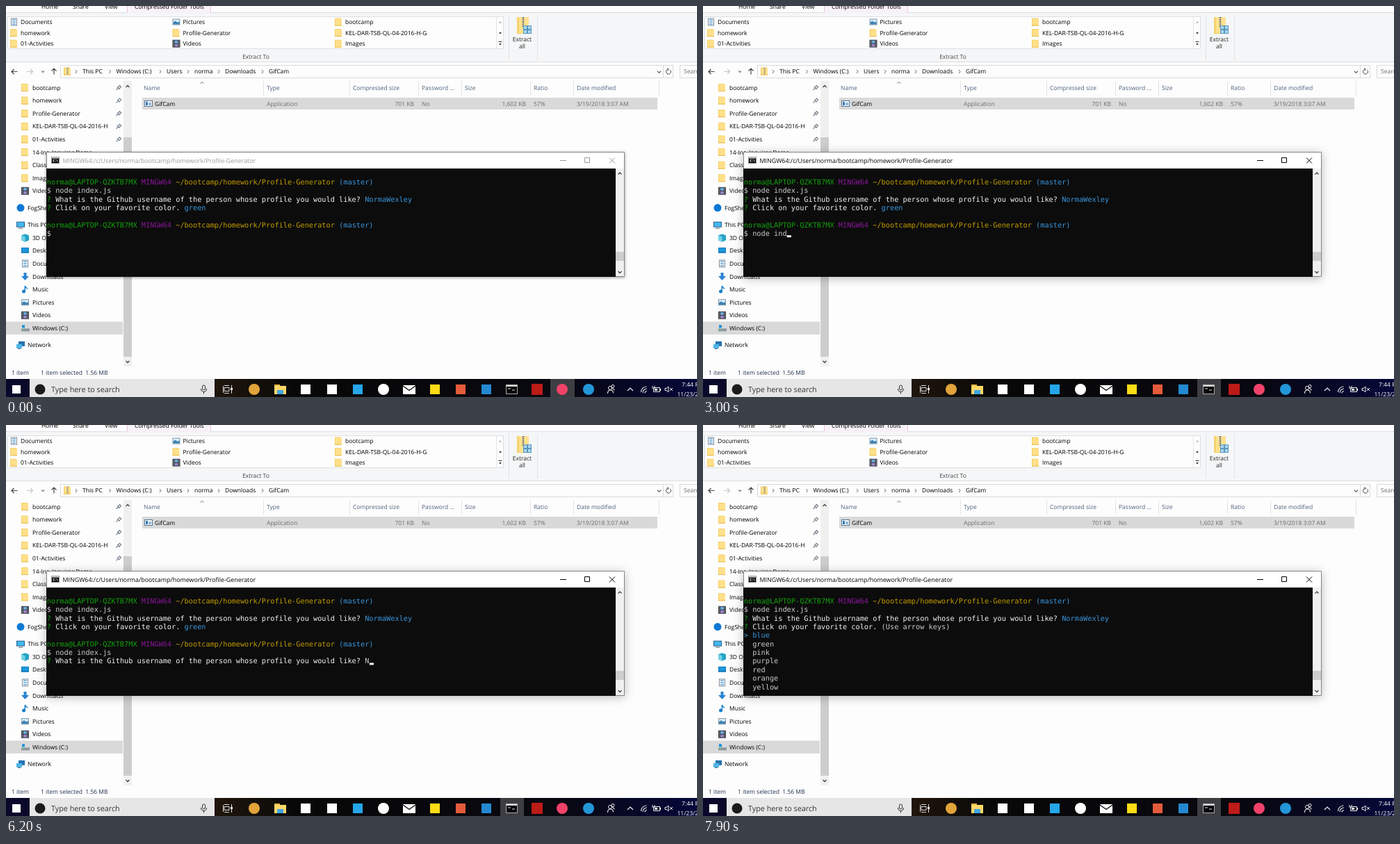
Recreate the animation shown at these times as an HTML page. Size 994 by 563 pixels, loop 8000 ms.

```html
<!DOCTYPE html>
<html lang="en">
<head>
<meta charset="utf-8">
<style>
html, body { margin: 0; width: 100%; height: 100%; overflow: hidden; background: #fdfdfd; }
svg { display: block; width: 994px; height: 563px; font: 8.5px "Open Sans", sans-serif; }
text { white-space: pre; text-rendering: geometricPrecision; }
.big { font-size: 10.8px; }
#caption { font-size: 8.9px; }
#term { font: 10.28px "DejaVu Sans Mono", monospace; }
</style>
</head>
<body>
<svg id="stage" viewBox="0 0 994 563"></svg>
<script>
const USER = 'norma', LOGIN = 'NormaWexley', COURSE = 'KEL-DAR-TSB-QL-04-2016-H-G';

const text = (x, y, s, fill = '#000', extra = '') => `<text x="${x}" y="${y}" fill="${fill}" ${extra}>${s}</text>`;
const rect = (x, y, w, h, fill, extra = '') => `<rect x="${x}" y="${y}" width="${w}" height="${h}" fill="${fill}" ${extra}/>`;
const frame = (x, y, w, h, stroke, fill = 'none') => rect(x + .5, y + .5, w - 1, h - 1, fill, `stroke="${stroke}"`);
const line = (d, stroke = '#444', width = 1, dash = 'none') =>
  `<path d="${d}" fill="none" stroke="${stroke}" stroke-width="${width}" stroke-dasharray="${dash}"/>`;
const shape = (d, fill) => `<path d="${d}" fill="${fill}"/>`;
const disc = (x, y, r, fill) => `<circle cx="${x}" cy="${y}" r="${r}" fill="${fill}"/>`;
const middle = 'text-anchor="middle"', right = 'text-anchor="end"';
const chevronRight = (x, y, color) => line(`M${x - 1} ${y - 2.5}l2 2.5l-2 2.5`, color, .9);
const chevronDown = (x, y, size, color) => line(`M${x - size} ${y - size / 2}l${size} ${size}l${size} ${-size}`, color, 1.1);

// Small icons, each about 11 by 11 with its top left corner at x, y
const icons = {
  folder: (x, y) => rect(x, y, 9, 11, '#f5cf68') + rect(x + 1, y + 1, 9, 10, '#ffe08a') + rect(x, y + 10, 10, 1, '#e7bd55'),
  doc: (x, y) => frame(x + 1, y, 9, 11, '#7d8b99', '#fff') + [2.5, 5.5, 8.5].map(d => line(`M${x + 3} ${y + d}h5`, '#4795cf', 1.3)).join(''),
  picture: (x, y) => frame(x, y + 1, 11, 9, '#8294a3', '#d9effb') + shape(`M${x + 1} ${y + 9}v-3l3-2 3 2 3-1v4z`, '#3f83b3'),
  video: (x, y) => rect(x, y, 11, 11, '#33363d') + rect(x + 3, y + 1, 5, 4, '#6aa8d8') + rect(x + 3, y + 6, 5, 4, '#9c83c4') +
    line(`M${x + 1.5} ${y + 1}v10M${x + 9.5} ${y + 1}v10`, '#ccc', 1, '1 1'),
  cloud: (x, y) => disc(x + 6, y + 5.5, 5.5, '#0f78d4'),
  pc: (x, y) => rect(x, y + 1, 12, 8, '#2a5d8c') + rect(x + 1, y + 2, 10, 6, '#43b8ee') + rect(x + 3, y + 10, 6, 1, '#567'),
  cube: (x, y) => shape(`M${x} ${y + 2}l5.5-2 5.5 2v7l-5.5 2.5-5.5-2.5z`, '#27a2c5') + shape(`M${x} ${y + 2}l5.5 2v7.5l-5.5-2.5z`, '#73d2e6'),
  desktop: (x, y) => rect(x, y + 1, 11, 8, '#1279be') + rect(x + 1, y + 2, 9, 5, '#1c98dd'),
  download: (x, y) => shape(`M${x + 3.5} ${y}h4v5h3.5l-5.5 6-5.5-6h3.5z`, '#2b83d1'),
  music: (x, y) => disc(x + 3.5, y + 8.5, 2.5, '#1b80c9') + line(`M${x + 5.3} ${y + 9}v-8.5q1 3 4 4`, '#1b80c9', 1.5),
  disk: (x, y) => rect(x, y + 6, 12, 4, '#8d979e') + rect(x + 1, y + 7, 3, 1, '#5ed86c') + rect(x + 1, y + 1, 4, 4, '#1590d8'),
  network: (x, y) => rect(x + 3, y, 9, 7, '#2572ae') + rect(x, y + 4, 8, 6, '#4cb6e8') + rect(x + 2, y + 10, 4, 1, '#456'),
};

function ribbon() {
  let s = rect(0, 0, 994, 9, '#fdfdfd') + rect(0, 9, 994, 71, '#f5f6f7') + line('M0 9.5H174M295 9.5H994M0 80.5H994', '#dcdddf');
  s += line('M174.5 0V9.5M294.5 0V9.5', '#efc1df') + rect(175, 0, 119, 10, '#f8f2f6');
  s += text(51, 4, 'Home') + text(96, 4, 'Share') + text(142, 4, 'View') + text(185, 4, 'Compressed Folder Tools');
  s += frame(2, 15, 714, 47, '#dcdfe3', '#fdfdfd') + line('M705.5 15V62M723.5 13V78M764.5 13V78', '#e2e3e4');
  const gallery = [
    ['doc', 'Documents'], ['folder', 'homework'], ['folder', '01-Activities'],
    ['picture', 'Pictures'], ['folder', 'Profile-Generator'], ['video', 'Videos'],
    ['folder', 'bootcamp'], ['folder', COURSE], ['folder', 'Images']];
  gallery.forEach(([icon, label], i) => {
    const x = 6 + 233.5 * Math.floor(i / 3), y = 17.5 + 15.6 * (i % 3);
    s += icons[icon](x, y) + text(x + 15, y + 8.7, label);
  });
  s += shape('M709 24.5h4l-2-2.5z', '#aaa') + shape('M709 38h4l-2 2.5zM709 54h4l-2 2.5z', '#333') + line('M708.5 51.5h5', '#333');
  s += text(359.5, 76, 'Extract To', '#444', middle) + text(742.5, 51, 'Extract', '#222', middle) + text(742.5, 61, 'all', '#222', middle);
  s += rect(735, 16, 16, 24, '#f6d36f') + rect(738, 16, 14, 23, '#ffe28e') + line('M744 16v14', '#69757d', 2.5, '2 1');
  return s + [0, 1, 2, 3].map(i => frame(744 + 6 * (i % 2), 28 + 6 * (i >> 1), 6, 6, '#5b96bd', '#a9d8ef')).join('');
}

function addressBar() {
  let s = line('M16.5 94.5H8M11.5 91l-3.5 3.5 3.5 3.5M69 98.5V90M65.5 93.5l3.5-3.5 3.5 3.5', '#444', 1.2);
  s += line('M30 94.5h8.5M35 91l3.5 3.5-3.5 3.5', '#c6c6c6', 1.2) + chevronDown(53, 94.5, 2, '#777');
  s += frame(78, 85, 882, 19, '#dadada', '#fdfdfd') + line('M945.5 85V104', '#dadada') + frame(969, 85, 40, 19, '#dadada', '#fdfdfd');
  s += icons.folder(83, 88.5) + line('M88.5 89v10', '#69757d', 2, '1 1');
  const crumbs = [[110, 'This PC'], [158.5, 'Windows (C:)'], [231, 'Users'], [271, USER], [315, 'Downloads'], [378, 'GifCam']];
  for (const [x, label] of crumbs) s += chevronRight(x - 9, 94.5, '#555') + text(x, 97, label);
  s += chevronDown(939.5, 95, 2.6, '#444') + line('M955.6 92.2A3.5 3.5 0 1 1 952 91.2M951 89.5l2.5 1.7-2 2');
  return s + text(975, 97, 'Search GifCam', '#6d6d6d');
}

function sidebar() {
  let s = rect(0, 454.5, 168, 18.5, '#d9d9d9');
  const rows = ['folder|bootcamp', 'folder|homework', 'folder|Profile-Generator', 'folder|' + COURSE.slice(0, -2), 'folder|01-Activities',
    'folder|14-Ins_Inquirer-Demo', 'folder|Class-Notes', 'folder|Images', 'video|Videos', 'cloud|FogShelf', 'pc|This PC', 'cube|3D Objects',
    'desktop|Desktop', 'doc|Documents', 'download|Downloads', 'music|Music', 'picture|Pictures', 'video|Videos', 'disk|Windows (C:)', 'network|Network'];
  rows.forEach((row, i) => {
    const [icon, label] = row.split('|');
    const y = 117.5 + 18.6 * i + (i > 8) * 5.7 + (i > 9) * 5.9 + (i > 18) * 5.9;
    const x = ['cloud', 'pc', 'network'].includes(icon) ? 15 : 22;
    s += icons[icon](x, y - 5.5) + text(x + 16, y + 3, label);
    if (i < 5) s += line(`M158.5 ${y + 3.5}l2.5-2.5M160 ${y - 1}l3.5 3.5M161 ${y - .5}l2.5-2.5 2 2-2.5 2.5`, '#7c8792', 1.3);
  });
  s += rect(169, 108, 12, 411, '#f0f0f0') + rect(169, 189, 12, 316, '#cdcdcd');
  return s + line('M172.5 117l2.5-2.5 2.5 2.5M172.5 511l2.5 2.5 2.5-2.5', '#444', 1.3);
}

function fileList() {
  const heads = [[198, 'Name'], [375, 'Type'], [499, 'Compressed size'], [598, 'Password ...'], [660, 'Size'], [759, 'Ratio'], [821, 'Date modified']];
  let s = heads.map(([x, label]) => text(x, 121, label, '#4c607a')).join('');
  s += line([370, 494, 593, 655, 754, 816, 939].map(x => `M${x}.5 108V129`).join(''), '#e3e3e3') + line('M279.5 111.5l2.5-2 2.5 2', '#777');
  s += rect(196, 132, 741, 17, '#d9d9d9') + frame(199, 136, 12, 9, '#56728c', '#fff') + rect(201, 138, 3, 5, '#2d79b8') + rect(205, 139, 4, 4, '#8bb6d8');
  s += text(214, 143.5, 'GifCam');
  const cells = [[375, 'Application'], [587, '701 KB', right], [598, 'No'], [748, '1,602 KB', right], [759, '57%'], [821, '3/19/2018 3:07 AM']];
  for (const [x, label, anchor] of cells) s += text(x, 143.5, label, '#6d6d6d', anchor);
  return s + text(8, 531, '1 item', '#1e2f4b') + text(50, 531, '1 item selected  1.56 MB', '#1e2f4b');
}

function taskbar() {
  const square = (x, color, r = 7) => rect(x - r, 552 - r, 2 * r, 2 * r, color);
  const stops = [[0, '#08082c'], [.3, '#20160c'], [.42, '#080808'], [.8, '#080810'], [1, '#06083a']];
  let s = `<linearGradient id="bar">${stops.map(([at, c]) => `<stop offset="${at}" stop-color="${c}"/>`).join('')}</linearGradient>`;
  s += rect(0, 537, 994, 26, 'url(#bar)') + '<g id="active"></g>';
  s += square(15, '#fff', 6) + rect(34, 537, 266, 26, '#e6e6e7') + disc(49, 552, 7.5, '#1b1b1b') + text(65, 556, 'Type here to search', '#333', 'class="big"');
  s += rect(282.5, 546, 4, 7, 'none', 'rx="2" stroke="#333"') + line('M280.5 551q0 4.5 4 4.5t4-4.5M284.5 555.5v3', '#333');
  s += line('M312.5 547v10M314 549.5h7v5h-7zM314 546.5h7M314 557.5h7M324.5 546v12', '#ddd') + rect(323, 550, 3, 3, '#fff');
  s += disc(357, 552, 8, '#e2a33a') + rect(386, 545, 8, 4, '#e9b63e') + rect(386, 547, 17, 12, '#ffd869') + rect(390, 553, 9, 6, '#41a5e1');
  s += square(431, '#fff') + square(469, '#fff') + square(506, '#25a6e9') + disc(543, 552, 8, '#fff');
  s += rect(571, 546, 18, 13, '#fff') + line('M571 547l9 6.5 9-6.5', '#080808', 1.4);
  s += square(617, '#fbdc16') + square(654, '#e45b3b') + square(691, '#2489d1');
  s += frame(719, 545, 17, 14, '#aaa', '#060606') + rect(720, 546, 15, 2, '#ddd') + line('M722 551h4M728 553h4', '#ddd');
  s += square(764, '#bd1b18', 8) + disc(800, 552, 8, '#f1436a') + disc(838, 552, 8, '#2396d8');
  s += line('M865.5 558q0-5 4-5t4 4.5M871.5 551q3-1 3.5 2.5', '#eee', 1.1) + '<g fill="none" stroke="#eee"><circle cx="869" cy="550" r="2.5"/><circle cx="873" cy="547.5" r="2"/></g>';
  s += line('M894 554l4-4 4 4', '#eee', 1.2) + line('M913.5 556a8 8 0 0 1 8-8M916 557a6 6 0 0 1 6-6M919 557.5a3 3 0 0 1 3-3', '#ddd', 1.2);
  s += line('M931.5 549.5h9v6h-9zM941.5 551v3', '#eee') + rect(933, 551, 4, 3, '#eee') + line('M930 547v4M933 547v4', '#eee');
  s += line('M948 550.5h2l3-2.5v8l-3-2.5h-2zM955 550l4 4M959 550l-4 4', '#eee');
  return s + text(988, 548, '7:44 PM', '#fff', middle) + text(988, 562, '11/23/2019', '#fff', middle);
}

function terminalWindow() {
  let s = rect(58, 210, 832, 180, '#fff', 'id="shadow"') + rect(876, 234, 13, 156, '#f0f0f0');
  s += line('M58.5 390V210.5H889.5V389.5H58', '#858585') + rect(58, 234, 819, 156, '#0c0c0c');
  s += rect(877, 354, 12, 13, '#cdcdcd') + line('M880.5 242.5l2.5-2.5 2.5 2.5M880.5 382l2.5 2.5 2.5-2.5', '#444', 1.3);
  s += frame(65, 217, 12, 10, '#999', '#050505') + rect(66, 218, 10, 1.5, '#ddd') + line('M70 221.5h-2v2.5h2M71.5 221v1M71.5 223.5v1M73 221l1.5 3.5', '#fff', .8);
  s += `<g id="caption">${text(81.5, 226, `MINGW64:/c/Users/${USER}/bootcamp/homework/Profile-Generator`, 'currentColor')}`;
  return s + line('M797 222.5h9M832.5 218.5h7v7h-7zM868 218.5l8 8M876 218.5l-8 8', 'currentColor') + '</g><g id="term"></g>';
}

const GREEN = '#13a10e', BLUE = '#3a96dd', GREY = '#ccc', WHITE = '#f2f2f2';
const prompt = [[`${USER}@LAPTOP-QZKTB7MX `, GREEN], ['MINGW64 ', '#881798'], ['~/bootcamp/homework/Profile-Generator ', '#c19c00'], ['(master)', BLUE]];
const command = 'node index.js';
const run = [['$ ' + command, GREY]];
const ask = (question, answer, color) => [['? ', GREEN], [question + ' ', WHITE], [answer, color]];
const askName = (answer, color) => ask('What is the Github username of the person whose profile you would like?', answer, color);
const askColor = (answer, color) => ask('Click on your favorite color.', answer, color);
const colors = ['green', 'pink', 'purple', 'red', 'orange', 'yellow'];

// Times in ms of key presses and caret changes
const commandKeys = [1400, 1800, 2000, 2100, 2300, 2900, 2900, 3000, 3200, 3400, 3700, 3900, 4000];
const loginKeys = [6200, 6300, 6400, 6500, 6600, 7000, 7100, 7200, 7500, 7600, 7700];
const caretOn = [1000, 4900, 5500, ...commandKeys, ...loginKeys];
const caretOff = [1500, 1900, 2400, 4400, 5400, 5800, 6800, 7300, 7800];

const typed = (s, keys, t) => s.slice(0, keys.filter(k => k <= t).length);
const latest = (times, t) => Math.max(0, ...times.filter(k => k <= t));
const baseline = row => 256.8 + 12.38 * row;

function terminalLines(t) {
  const top = [prompt, run, askName(LOGIN, BLUE)];
  if (t >= 7900) return [...top, askColor('(Use arrow keys)', GREY), [['> blue', BLUE]], ...colors.map(c => [['  ' + c, GREY]])];
  const lines = [...top, askColor('green', BLUE), [], prompt, [['$ ' + typed(command, commandKeys, t), GREY]]];
  if (t >= 4900) lines.push(t < 5500 ? [] : askName(typed(LOGIN, loginKeys, t), t < 7800 ? GREY : BLUE));
  return lines;
}

function terminal(t) {
  const lines = terminalLines(t);
  let s = lines.map((parts, row) => text(58.8, baseline(row), parts.map(([p, c]) => `<tspan fill="${c}">${p}</tspan>`).join(''))).join('');
  if (latest(caretOn, t) > latest(caretOff, t)) {
    const column = lines.at(-1).map(part => part[0]).join('').length;
    s += rect(58.8 + 6.187 * column, baseline(lines.length - 1) - 1, 6.2, 3, WHITE);
  }
  return s;
}

stage.innerHTML = ribbon() + addressBar() + sidebar() + fileList() + taskbar() + terminalWindow();
const [shadowBox, captionBox, activeBox, termBox] = ['shadow', 'caption', 'active', 'term'].map(id => document.getElementById(id));
let shown = -1;

function draw() {
  const t = Math.floor(performance.now() % 8000 / 100) * 100;
  if (t !== shown) {
    shown = t;
    const focused = t >= 500;
    shadowBox.style.filter = focused ? 'drop-shadow(0 2px 7px #0004)' : 'drop-shadow(0 1px 2px #0006)';
    captionBox.style.color = focused ? '#000' : '#999';
    activeBox.innerHTML = t < 500 ? rect(783, 537, 35, 26, '#3c3e42')
      : t < 600 ? rect(785, 545, 32, 18, '#34363b') + rect(713, 561, 30, 2, '#6d7c8c')
      : rect(711, 537, 34, 26, '#3c3e42');
    termBox.innerHTML = terminal(t);
  }
  requestAnimationFrame(draw);
}
draw();
</script>
</body>
</html>
```
